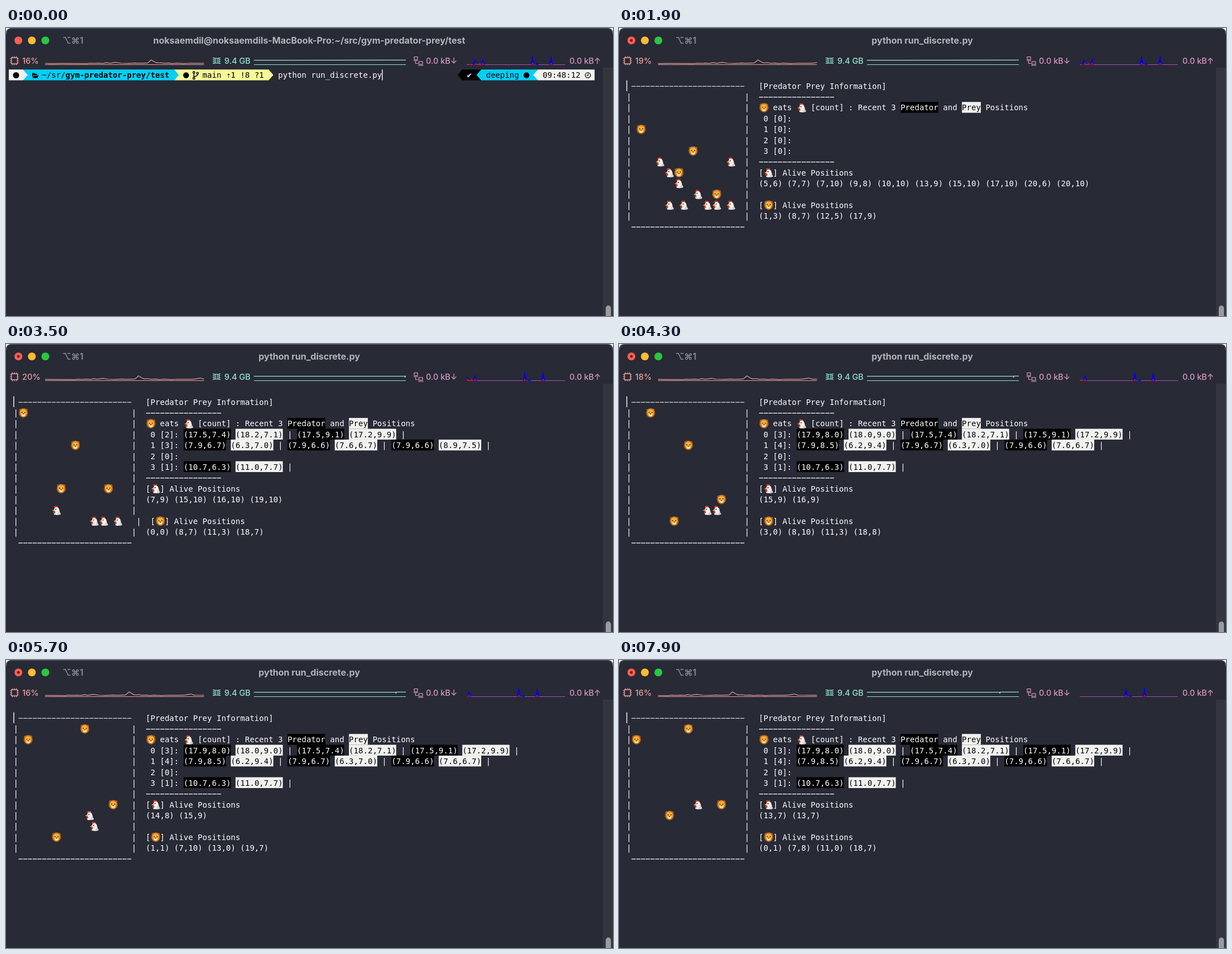
Recreate the animation shown at these times as an HTML page. Size 1087 by 515 pixels, loop 8000 ms.

```html
<!DOCTYPE html>
<html lang="en">
<head>
<meta charset="utf-8">
<title>Predator Prey terminal</title>
<style>
html, body { margin: 0; width: 100%; height: 100%; overflow: hidden; background: #fff; }
svg { display: block; width: 1087px; height: 515px; }
text { white-space: pre; }
.mono { font: 14.05px "DejaVu Sans Mono", monospace; fill: #fff; }
.bar { font: 500 14.5px Inter, "DejaVu Sans", sans-serif; }
.tab { font: 600 15.5px Inter, "DejaVu Sans", sans-serif; fill: #8c8d94; }
.title { font: 700 16px Inter, "DejaVu Sans", sans-serif; fill: #b3b4b9; text-anchor: middle; }
</style>
</head>
<body>
<svg viewBox="0 0 1087 515" xmlns="http://www.w3.org/2000/svg">
  <defs>
    <symbol id="lion" viewBox="-10 -10 20 20" overflow="visible">
      <circle cx="-6" cy="-6" r="2.4" fill="#c06a16"/><circle cx="6" cy="-6" r="2.4" fill="#c06a16"/>
      <path d="M0-9.4Q5-10 7.5-6Q10.2-1 8.6 3Q7 8 0 9.6Q-7 8-8.6 3Q-10.2-1-7.5-6Q-5-10 0-9.4Z" fill="#b9631a"/>
      <path d="M0-7.6Q5-7.5 6.3-3Q7 3 3.8 6.2Q0 9-3.8 6.2Q-7 3-6.3-3Q-5-7.5 0-7.6Z" fill="#f5b13a"/>
      <path d="M-3-7.6Q0-4.5 3-7.6Q0-10-3-7.6Z" fill="#dd8a25"/>
      <ellipse cy="4" rx="3.2" ry="2.6" fill="#fbe3b4"/>
      <path d="M-2 1H2L0 3.4Z" fill="#4a2a1a"/>
      <circle cx="-3.1" cy="-1.2" r="1.1" fill="#3a2114"/><circle cx="3.1" cy="-1.2" r="1.1" fill="#3a2114"/>
    </symbol>
    <symbol id="hen" viewBox="-10 -10 20 20" overflow="visible">
      <path d="M-4-5Q-6.5-8-3.5-8.5Q-2-10 0-8.6Q3-9.5 3.2-6.5L1-4Z" fill="#e2382f"/>
      <path d="M-4.6-2Q-4-6.6 0-6.6Q4.6-6.4 5.6-1Q6.4 4 9 7.6Q5 9.8-1 9.2Q-5 9-5.4 7.6Q-3.6 4-4.6-2Z" fill="#f4f0ed"/>
      <path d="M5 0Q6.4 4 9 7.6Q6.5 9-.5 9.2Q5 6 5 0Z" fill="#d6ccc8"/>
      <path d="M-4-2.8L-9 .6L-3.6 1.6Z" fill="#f2a83b"/>
      <ellipse cx="-4.6" cy="4" rx="1.9" ry="2.7" fill="#e2382f"/>
      <circle cx="-1.4" cy="-2.2" r="1.1" fill="#2b1c1a"/>
    </symbol>
    <clipPath id="cpuClip"><rect x="70" y="48" width="284.5" height="20"/></clipPath>
    <clipPath id="memClip"><rect x="444" y="48" width="272" height="20"/></clipPath>
    <clipPath id="netClip"><rect x="825" y="48" width="176" height="20"/></clipPath>
  </defs>

  <path d="M0 515V10Q0 0 10 0H1077Q1087 0 1087 10V515Z" fill="#282a36"/>
  <path d="M.5 11Q.5 .5 11 .5H1076Q1086.5 .5 1086.5 11" fill="none" stroke="#5c5d66"/>
  <rect x="1069" y="71" width="18" height="444" fill="#33353f"/>
  <path d="M1074 515V501a4.7 4.7 0 0 1 9.4 0V515Z" fill="#9c9ca0"/>

  <circle cx="22.2" cy="22.2" r="7" fill="#ff5f57"/>
  <circle id="busy" cx="22.2" cy="22.2" r="2.4" fill="#7e0f0a"/>
  <circle cx="46.3" cy="22.2" r="7" fill="#febc2e"/>
  <circle cx="70.5" cy="22.2" r="7" fill="#28c840"/>
  <text x="101" y="28.3" class="tab">⌥⌘1</text>
  <text id="title" x="543" y="28.3" class="title"></text>

  <g fill="none" stroke="#e89d98" stroke-width="1.2">
    <rect x="9.7" y="53.2" width="10.8" height="10.8" stroke-width="1.5"/>
    <path d="M11.5 50.5v2.5m3.5-2.5v2.5m3.5-2.5v2.5M11.5 64v2.5m3.5-2.5v2.5m3.5-2.5v2.5M7 55h2.5M7 58.5h2.5M7 62h2.5M20.5 55h2.5m-2.5 3.5h2.5m-2.5 3.5h2.5"/>
    <path d="M70 65.5H354.5" stroke-width="1"/>
    <g clip-path="url(#cpuClip)"><polyline id="cpu"/></g>
  </g>
  <text id="load" x="29" y="64" class="bar" fill="#e89d98"></text>

  <g fill="none" stroke="#93e6cf" stroke-width="1.2">
    <path d="M370 53.5h3v10h-3m14.5-10h-3v10h3M373 54h8.5M373 63h8.5M375.5 54v9m3.5-9v9M370 57h3m-3 3.5h3m8.5-3.5h3m-3 3.5h3"/>
    <path d="M444 65.5H716" stroke-width="1"/>
    <g clip-path="url(#memClip)"><path id="mem" d="M440 57.7L736 57.4l.5 2.8l.5-2.8H780"/></g>
  </g>
  <text x="391" y="64" class="bar" fill="#93e6cf">9.4 GB</text>

  <g fill="none" stroke="#d697c4" stroke-width="1.2">
    <rect x="731" y="51.5" width="6" height="5"/><rect x="739.5" y="60" width="6.5" height="5"/>
    <path d="M730 58.5h8M738 67h9.5M733.5 58.5v5h5"/>
  </g>
  <text x="752" y="64" class="bar" fill="#d697c4">0.0 kB↓</text>
  <text x="1009" y="64" class="bar" fill="#d697c4">0.0 kB↑</text>
  <path d="M825 65.5H1001" stroke="#a850bc"/>
  <g clip-path="url(#netClip)"><g id="net"></g></g>

  <g id="screen"></g>
</svg>
<script>
const LOOP = 8000, TICK = 100, ENTER = 1500, START = 1900;
const COL = 8.46, ROW = 19.35, LEFT = 5, MID = 84.6;
const CELL_TOP = -10.4;
const INFO = 29, SAMPLE = 390;
const WHITE = '#f1f1f0', CYAN = '#00d0f8', YELLOW = '#f5f998';
const $ = id => document.getElementById(id);
const colX = c => LEFT + c * COL;
const rowY = r => MID + r * ROW;

// Screen primitives, addressed by column and row
const put = (c, r, s, attrs = '') =>
  `<text class="mono" x="${colX(c)}" y="${rowY(r) + 4.8}" ${attrs}>${s}</text>`;
const dark = 'style="fill:#000"';
const mark = (c, r, s, fill, attrs = '') =>
  `<rect x="${colX(c)}" y="${rowY(r) + CELL_TOP}" width="${s.length * COL}" height="${ROW}" fill="${fill}"/>` + put(c, r, s, attrs);
const emoji = (kind, c, r) =>
  `<use href="#${kind}" x="${colX(c + 1) + .8 - 8.8}" y="${rowY(r) - 8.8}" width="17.6" height="17.6"/>`;
const rule = (c, r, n) =>
  `<path d="M${colX(c) + .5} ${rowY(r) + .3}h${n * COL - 1}" stroke="#fff" stroke-width="1.2" stroke-dasharray="7.46 1"/>`;
const caret = (c, r) =>
  `<rect x="${colX(c) - .2}" y="${rowY(r) + CELL_TOP}" width="1.4" height="${ROW}" fill="#fff"/>`;

// Prompt block whose arrow tip reaches one column past its end (dir 1) or start (dir -1)
function segment(from, to, fill, dir) {
  const [flat, shoulder] = (dir > 0 ? [from, to] : [to, from]).map(colX);
  const top = MID + CELL_TOP, bottom = top + ROW;
  return `<path d="M${flat} ${top}H${shoulder}L${shoulder + dir * COL} ${(top + bottom) / 2}L${shoulder} ${bottom}H${flat}Z" fill="${fill}"/>`;
}
const badge = (x, r) => `<circle cx="${x}" cy="84.5" r="${r}" fill="#000"/>`;

const prompt =
  segment(35, 55, YELLOW, 1) + segment(3, 35, CYAN, 1) + segment(0, 3, WHITE, 1) +
  badge(18, 5.5) + badge(322.5, 5.2) +
  `<path d="M47 80.5h4l1 1.5h4v2h-6.5l-2.5 4.5zM50 85h8.5l-2.2 4.5h-8.5z" fill="#000"/>` +
  `<g fill="none" stroke="#000" stroke-width="1.4"><circle cx="336.5" cy="79.5" r="1.7"/><circle cx="336.5" cy="90" r="1.7"/>` +
  `<circle cx="343" cy="81" r="1.7"/><path d="M336.5 81v8M343 83q0 3-6.5 4"/></g>` +
  put(7, 0, '~/sr/', dark) + put(12, 0, 'gym-predator-prey/test', 'style="fill:#000;font-weight:700"') +
  put(41, 0, 'main ⇡1 !8 ?1', dark) + put(57, 0, 'python run_discrete.py') +
  segment(96, 100, '#000', -1) + segment(100, 112, CYAN, -1) + segment(112, 124, WHITE, -1) +
  put(97, 0, '✔') + put(101, 0, 'deeping', dark) + badge(932, 5.2) + put(113, 0, '09:48:12', dark) +
  `<path d="M1042.5 81.5v3.5h-3" fill="none" stroke="#000" stroke-width="1.2"/>` +
  `<circle cx="1042" cy="84.5" r="4.7" fill="none" stroke="#000" stroke-width="1.3"/>`;

// Paths visit one point per time in TIMES; an eaten animal has an end
const TIMES = [START, 2500, 3500, 4300, 5700, 7900];
const animal = (kind, path, end = Infinity) =>
  ({ kind, end, path: path.split(' ').map(p => p.split(',').map(Number)) });
const animals = [
  animal('lion', '1,3 0,1 0,0 3,0 1,1 0,1'),
  animal('lion', '8,7 8,6 8,7 8,10 7,10 7,8'),
  animal('lion', '12,5 11,6 11,3 11,3 13,0 11,0'),
  animal('lion', '17,9 18,7 18,7 18,8 19,7 18,7'),
  animal('hen', '10,10 11,10 15,10 15,9 14,8 13,7'),
  animal('hen', '15,10 16,10 16,10 16,9 15,9 13,7'),
  animal('hen', '5,6 6,6 6,7', 2800),
  animal('hen', '7,10 7,10 7,9 6,9', 3800),
  animal('hen', '13,9 12,8 11,7', 2700),
  animal('hen', '20,6 20,7 18,7', 3000),
  animal('hen', '20,10 20,10 19,10 18,9', 4000),
  animal('hen', '17,10 17,10', 2100),
  animal('hen', '9,8 9,7', 2200),
  animal('hen', '7,7 7,6', 2400),
];
const meals = [
  [2100, 0, '(17.5,9.1)', '(17.2,9.9)'], [2200, 1, '(7.9,6.6)', '(8.9,7.5)'],
  [2400, 1, '(7.9,6.6)', '(7.6,6.7)'], [2700, 3, '(10.7,6.3)', '(11.0,7.7)'],
  [2800, 1, '(7.9,6.7)', '(6.3,7.0)'], [3000, 0, '(17.5,7.4)', '(18.2,7.1)'],
  [3800, 1, '(7.9,8.5)', '(6.2,9.4)'], [4000, 0, '(17.9,8.0)', '(18.0,9.0)'],
];

function locate({ kind, path }, t) {
  let i = 0;
  while (i < path.length - 2 && t >= TIMES[i + 1]) i++;
  const f = Math.min(1, (t - TIMES[i]) / (TIMES[i + 1] - TIMES[i]));
  const [x, y] = path[i].map((v, k) => Math.round(v + (path[i + 1][k] - v) * f));
  return { kind, x, y };
}

// Wide glyphs push their neighbours; a pushed neighbour pushes what follows it
function boardRow(cells, y) {
  const r = y + 2;
  let out = put(1, r, '|'), push = 0, wall = 0, last = null;
  for (const { kind, x } of cells.filter(c => c.y === y)) {
    if (x === last) continue;
    if (push) wall = push;
    if (last !== null && x - last < 2) push++;
    out += emoji(kind, 2 + x + push, r);
    last = x;
  }
  return { out: out + put(26 + wall, r, '|'), wall };
}

function mealRow(t, lion) {
  const eaten = meals.filter(m => m[0] <= t && m[1] === lion).reverse();
  const r = 4 + lion;
  let c = INFO + 8, out = put(INFO, r, ` ${lion} [${eaten.length}]:`);
  for (const [, , hunter, prey] of eaten.slice(0, 3)) {
    out += mark(c, r, hunter, '#000');
    c += hunter.length + 1;
    out += mark(c, r, prey, WHITE, dark);
    c += prey.length + 1;
    out += put(c, r, '|');
    c += 2;
  }
  return out;
}

function game(t) {
  const cells = animals.filter(a => t < a.end).map(a => locate(a, t)).sort((a, b) => a.x - b.x || a.y - b.y);
  const list = kind => cells.filter(c => c.kind === kind).map(c => `(${c.x},${c.y})`).join(' ');
  const rows = Array.from({ length: 12 }, (_, y) => boardRow(cells, y));
  const info = (r, draw) => draw(INFO + rows[r - 2].wall, r);
  const heading = kind => (c, r) => put(c, r, '[') + emoji(kind, c + 1, r) + put(c + 3, r, '] Alive Positions');
  return caret(1, 1) + rule(2, 1, 24) + rows.map(r => r.out).join('') + rule(2, 14, 24) +
    put(INFO, 1, '[Predator Prey Information]') + rule(INFO, 2, 16) +
    emoji('lion', INFO, 3) + put(32, 3, 'eats') + emoji('hen', 37, 3) + put(40, 3, '[count] : Recent 3') +
    mark(59, 3, 'Predator', '#000') + put(68, 3, 'and') + mark(72, 3, 'Prey', WHITE, dark) + put(77, 3, 'Positions') +
    [0, 1, 2, 3].map(i => mealRow(t, i)).join('') + rule(INFO, 8, 16) +
    info(9, heading('hen')) + info(10, (c, r) => put(c, r, list('hen'))) +
    info(12, heading('lion')) + info(13, (c, r) => put(c, r, list('lion')));
}

// Status bar charts
$('cpu').setAttribute('points', '70,63 78,63.6 100,63.4 146,63.6 152,62.8 158,63.4 166,62.8 174,63.4 180,61.8 186,63.2 196,61.4 206,63 220,63.4 231,62.6 237,63.2 246,62.8 254,62.4 260,57 266,60.5 270,62.4 278,62 283,63.2 291,62.6 297,63.6 306,62.8 318,63.6 330,63 354,63.2 362,62.4 371,60.8 377,62.8 388,63 400,63.2 420,63.2');
const spike = (x, h, color, w = 3) =>
  `<path d="M${x - w} 65.5L${x} ${65.5 - h}L${x + w} 65.5Z" fill="${color}" stroke="${color}" stroke-width=".6"/>`;
$('net').innerHTML =
  [[839, 10], [854, 10], [943, 15.5], [951, 3], [976, 15.5]].map(([x, h]) => spike(x, h, '#00f')).join('') +
  [[831, 1.5], [841, 3], [848, 3], [854, 3], [943, 3], [976, 3]].map(([x, h]) => spike(x, h, '#f00', 2)).join('');

const loads = [[0, 16], [1000, 19], [2200, 27], [3000, 20], [4000, 18], [5200, 16]];

function render(t) {
  const step = Math.floor(t / SAMPLE), running = t >= ENTER;
  const slide = (id, width) => $(id).setAttribute('transform', `translate(${-step * width / 100})`);
  slide('cpu', 284);
  slide('mem', 272);
  slide('net', 176);
  $('load').textContent = loads.findLast(l => l[0] <= t)[1] + '%';
  $('busy').setAttribute('visibility', running ? 'visible' : 'hidden');
  $('title').textContent = running ? 'python run_discrete.py'
    : 'noksaemdil@noksaemdils-MacBook-Pro:~/src/gym-predator-prey/test';
  $('screen').innerHTML = t >= START ? game(t) : prompt + (running ? caret(0, 1) : caret(79, 0));
}

const begin = performance.now();
let shown = -1;
function loop() {
  const t = Math.floor((performance.now() - begin) % LOOP / TICK) * TICK;
  if (t !== shown) render(shown = t);
  requestAnimationFrame(loop);
}
loop();
</script>
</body>
</html>
```
